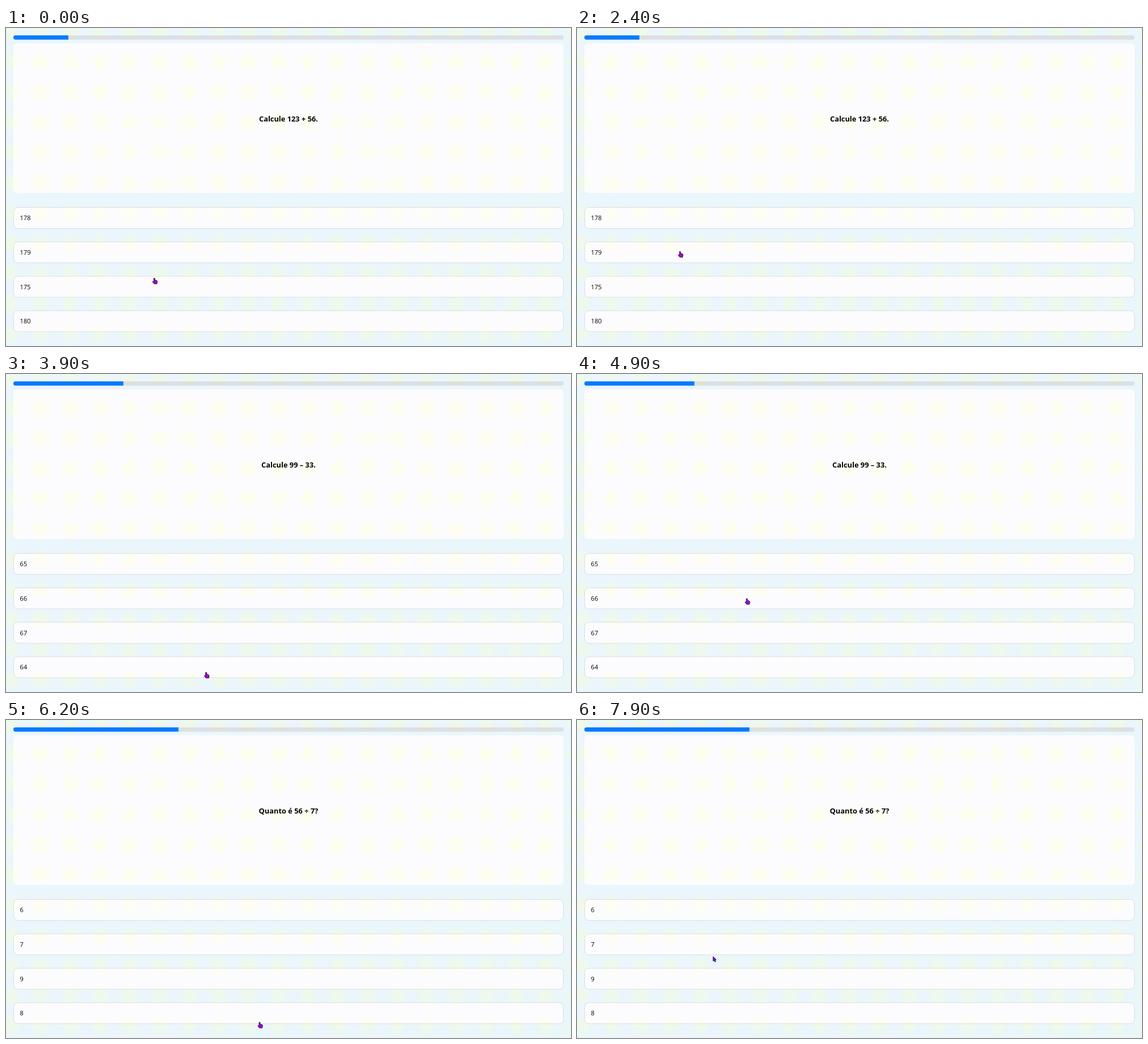
Write an HTML page with a canvas that moves like this. It is 998 px wide and 561 px high and loops after 8 s.

```html
<!DOCTYPE html>
<html lang="pt">
<head>
<meta charset="utf-8">
<title>Quiz</title>
<style>
  html, body { margin: 0; width: 100%; height: 100%; overflow: hidden; background: #ebf6fd; }
  #stage { position: absolute; left: 0; top: 0; width: 998px; height: 561px; overflow: hidden;
    font-family: "Open Sans", "Noto Sans", sans-serif; color: #000; }
  canvas { position: absolute; left: 0; top: 0; }
  .label { position: absolute; height: 20px; line-height: 20px; white-space: nowrap; }
  .wide { left: 13px; width: 972px; text-align: center; font-weight: 700; }
  #title { font-size: 12.85px; }
  #next { top: 520.6px; font-size: 10.9px; color: #fff; }
  .option { left: 24.6px; font-size: 11.1px; }
  svg { position: absolute; left: 0; top: 0; width: 12px; height: 14px; overflow: visible; }
</style>
</head>
<body>
<div id="stage">
  <canvas id="view" width="998" height="561"></canvas>
  <div id="title" class="label wide"></div>
  <div class="label option"></div>
  <div class="label option"></div>
  <div class="label option"></div>
  <div class="label option"></div>
  <div id="next" class="label wide">Próxima Pergunta</div>
  <svg id="pointer">
    <path id="hand" fill="#a900de" stroke="#25003a" stroke-width="1" stroke-linejoin="round"
      d="M-.9 .6Q0 -.3 .9 .6V3.6L4 4.4Q5.3 4.8 5.2 6.2L4.6 10.2H-.4L-3 7Q-3 5.6 -1.6 6.1L-.9 6.6Z"/>
    <path id="arrow" fill="#8510c8" stroke="#3a0870" stroke-width="1" stroke-linejoin="round"
      d="M.4 .4V8.3L2.2 6.7L3.6 9.7L5 9L3.6 6.1H6Z"/>
  </svg>
</div>
<script>
const LOOP = 8000, STEP = 100;
const LEFT = 13, WIDTH = 972;
const $ = id => document.getElementById(id);
const ctx = $('view').getContext('2d');
const optionLabels = [...document.querySelectorAll('.option')];

const questions = [
  { text: 'Calcule 123 + 56.', options: [178, 179, 175, 180] },
  { text: 'Calcule 99 – 33.', options: [65, 66, 67, 64] },
  { text: 'Quanto é 56 ÷ 7?', options: [6, 7, 9, 8] }
];

// [start, question index, answered]
const scenes = [
  [0, 0, false], [2600, 0, true],
  [3600, 1, false], [5100, 1, true],
  [6200, 2, false]
];

// [time, x, y] of the pointer tip
const path = [
  [0, 262, 441], [300, 262, 441], [1500, 182, 394], [2600, 182, 394],
  [3300, 348, 531], [3600, 348, 531], [3900, 353.5, 526], [4800, 300, 396],
  [5200, 300, 396], [5900, 448, 533], [6200, 448, 533], [6700, 461.5, 531],
  [6900, 461.5, 531], [7900, 240, 417], [8000, 240, 417]
];

const layouts = {
  false: { cardEnd: 291, titleY: 160, first: 316.5, gap: 60.75 },
  true: { cardEnd: 267, titleY: 148, first: 289.5, gap: 55 }
};
const ROW = 37;
const button = { y: 513.5, h: 34.5 };

function box(x, y, w, h, r) {
  ctx.beginPath();
  ctx.roundRect(x, y, w, h, r);
}

// Soft lattice of round spots inside the current clip
function spots(rgb, alpha) {
  for (let y = 6.7; y < 580; y += 53.3) {
    for (let x = 8.3; x < 1020; x += 52.5) {
      const g = ctx.createRadialGradient(x, y, 0, x, y, 19);
      g.addColorStop(0, `rgba(${rgb},${alpha})`);
      g.addColorStop(0.5, `rgba(${rgb},${alpha * 0.85})`);
      g.addColorStop(1, `rgba(${rgb},0)`);
      ctx.fillStyle = g;
      ctx.fillRect(x - 19, y - 19, 38, 38);
    }
  }
}

function panel(x, y, w, h, r, fill, spotColor, alpha) {
  box(x, y, w, h, r);
  ctx.fillStyle = fill;
  ctx.fill();
  ctx.save();
  ctx.clip();
  spots(spotColor, alpha);
  ctx.restore();
}

function drawScene(index, answered) {
  const lay = layouts[answered], q = questions[index];
  const base = ctx.createLinearGradient(0, 0, 998, 561);
  base.addColorStop(0, '#ebf6fd');
  base.addColorStop(1, '#e9f6fa');
  ctx.fillStyle = base;
  ctx.fillRect(0, 0, 998, 561);
  spots('240,249,232', 0.85);

  panel(LEFT, 13, WIDTH, 7.6, 3.8, '#dce0e4', '226,224,210', 0.7);
  box(LEFT, 13, WIDTH * (index + 1) / 10, 7.6, [3.8, 0, 0, 3.8]);
  ctx.fillStyle = '#007bff';
  ctx.fill();

  panel(LEFT, 27, WIDTH, lay.cardEnd - 27, 7, '#fcfcfe', '254,254,239', 1);

  optionLabels.forEach((label, i) => {
    const y = lay.first + i * lay.gap;
    const right = answered && i === 1;
    if (right) panel(13.5, y, 971, ROW, 7.5, '#d1f0da', '215,238,211', 0.8);
    else panel(13.5, y, 971, ROW, 7.5, '#fcfcfe', '254,254,241', 0.9);
    box(13.5, y, 971, ROW, 7.5);
    ctx.strokeStyle = right ? '#55b75c' : '#dbdedf';
    ctx.lineWidth = right ? 1.3 : 1;
    ctx.stroke();
    label.textContent = q.options[i];
    label.style.top = y + ROW / 2 - 9.9 + 'px';
  });

  if (answered) {
    box(LEFT, button.y, WIDTH, button.h, 7);
    ctx.fillStyle = '#057cfc';
    ctx.fill();
  }
  $('next').style.display = answered ? 'block' : 'none';
  $('title').textContent = q.text;
  $('title').style.top = lay.titleY - 10.3 + 'px';
}

function pointerAt(t) {
  const i = path.findIndex(p => p[0] > t);
  const [t0, x0, y0] = path[i - 1], [t1, x1, y1] = path[i];
  const k = (t - t0) / (t1 - t0), e = k * k * (3 - 2 * k);
  return [x0 + (x1 - x0) * e, y0 + (y1 - y0) * e];
}

function clickable(y, answered) {
  const lay = layouts[answered];
  const inside = (top, h) => y >= top && y <= top + h;
  return [0, 1, 2, 3].some(i => inside(lay.first + i * lay.gap, ROW)) ||
    (answered && inside(button.y, button.h));
}

let shown = null;
function frame(now) {
  const t = Math.floor((now % LOOP) / STEP) * STEP;
  const scene = scenes.filter(s => s[0] <= t).pop();
  if (scene !== shown) {
    shown = scene;
    drawScene(scene[1], scene[2]);
  }
  const [x, y] = pointerAt(t);
  const over = clickable(y, scene[2]);
  $('hand').style.display = over ? 'inline' : 'none';
  $('arrow').style.display = over ? 'none' : 'inline';
  $('pointer').style.transform = `translate(${x}px, ${y}px)`;
}

const start = performance.now();
function tick() {
  frame(performance.now() - start);
  requestAnimationFrame(tick);
}
tick();
</script>
</body>
</html>
```
